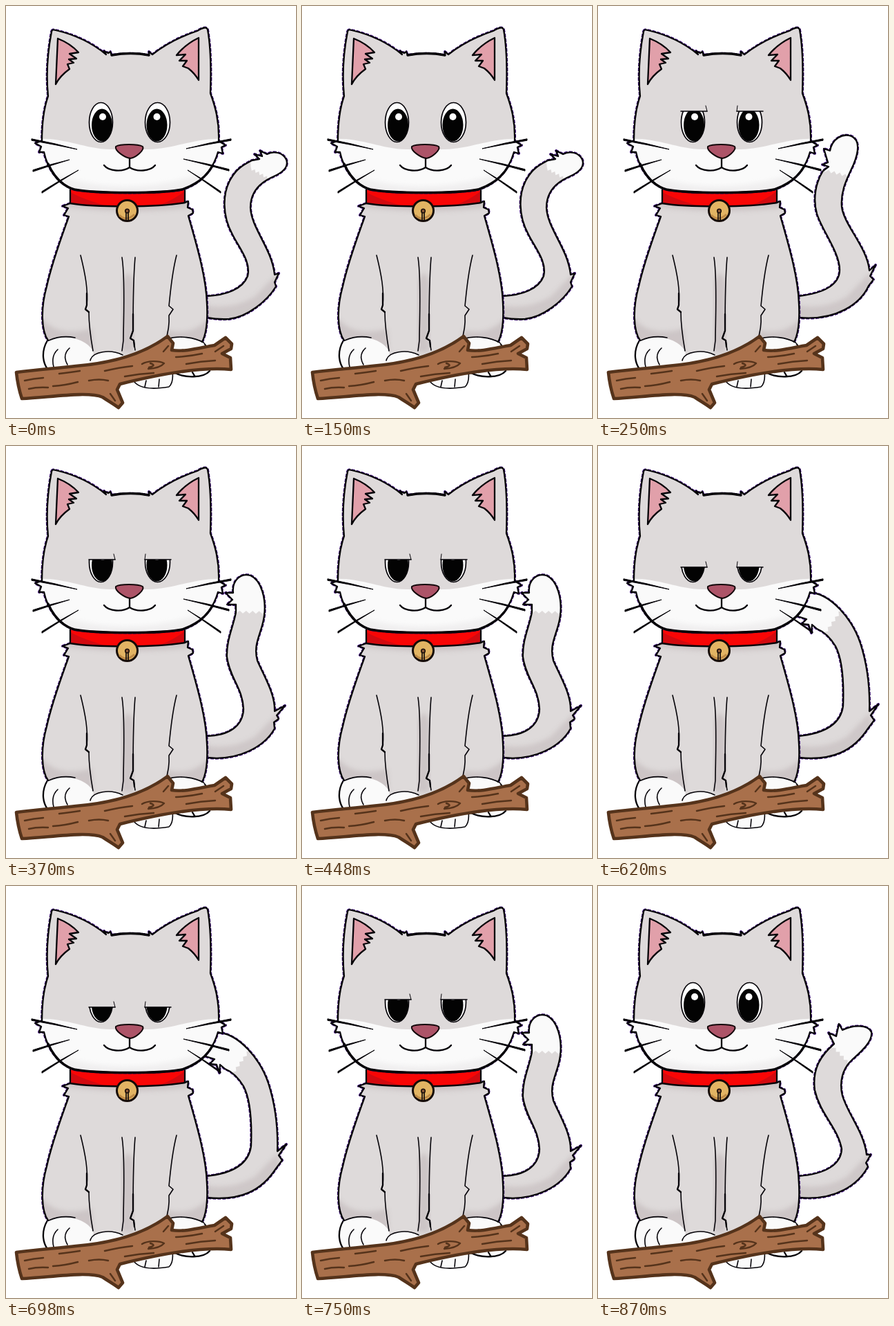
An HTML page for the animation above (1 s loop, 420 by 595 pixels).

```html
<!DOCTYPE html>
<html lang="en">
<head>
<meta charset="utf-8">
<title>Cat on a branch</title>
<style>
html, body { margin: 0; width: 100%; height: 100%; overflow: hidden; background: #fff; }
svg { display: block; width: 100vw; height: 100vh; }
.ink { fill: none; stroke: #050308; stroke-width: 2.3; stroke-linecap: round; stroke-linejoin: round; }
.thin { stroke-width: 1.6; }
.bold { stroke-width: 3.4; }
.fringe { fill: none; stroke: #3a0a78; stroke-width: 3.8; stroke-dasharray: 5 2; stroke-linejoin: round; }
.fur { fill: #dedada; }
.white { fill: #fafafa; }
.shade { fill: #c8c0c1; }
.grain { fill: none; stroke: #55331b; stroke-width: 2.4; stroke-linecap: round; stroke-linejoin: round; }
</style>
</head>
<body>
<svg viewBox="0 0 420 595">
  <defs>
    <path id="headShape" d="M66 37 Q67 33 72 35 C98 41 123 52 145 70 L142 65 L148 68 L151 66 L153 71 C170 68 191 68 207 71 L207 66 L212 70 C229 57 250 45 277 36 Q290 28 292 34 C297 62 297 97 296 126 C303 145 309 166 308 195 L318 201 L312 204 L314 213 L307 211 C300 235 284 256 255 265 C225 271 130 271 99 265 C76 257 60 235 55 211 L48 211 L51 203 L42 198 L52 195 C52 175 54 150 61 130 C58 100 60 68 66 37Z"/>
    <path id="bodyShape" d="M93 285 L82 289 L90 292 L84 302 L91 304 C80 335 67 369 59 405 C50 437 51 469 61 483 L100 506 L240 506 L284 485 C291 472 292 450 291 430 C290 392 276 345 264 303 L271 299 L270 294 L263 291 L264 282Z"/>
    <path id="sides" d="M93 285 L82 289 L90 292 L84 302 L91 304 C80 335 67 369 59 405 C50 437 51 469 61 483 M259 284 L264 282 L263 291 L270 294 L271 299 L264 303 C276 345 290 392 291 430 C292 450 291 472 284 485"/>
    <clipPath id="headClip"><use href="#headShape"/></clipPath>
    <clipPath id="bodyClip"><use href="#bodyShape"/></clipPath>
    <clipPath id="tailClip"><path id="tailMask"/></clipPath>
    <clipPath id="lidClip"><rect id="opening" x="100" width="160" height="80"/></clipPath>
    <filter id="soft"><feGaussianBlur stdDeviation="3"/></filter>
  </defs>

  <g>
    <path id="tailFringe" class="fringe"/>
    <path id="tailFur" class="fur"/>
    <g clip-path="url(#tailClip)">
      <path class="shade" filter="url(#soft)" opacity=".7" d="M288 432 Q325 440 360 420 L393 386 L398 412 L345 458 L288 458Z"/>
      <polygon id="tailTip" class="white"/>
    </g>
    <path id="tailInk" class="ink"/>
  </g>

  <g>
    <path class="white" d="M60 481 C49 498 53 515 60 524 L131 515 L126 482Z"/>
    <path class="white" d="M233 480 L285 483 C293 492 297 514 295 529 C284 539 256 537 244 529Z"/>
    <path class="ink" d="M60 483 C50 500 54 516 60 524 M284 485 Q292 491 294 502 M295 527 C286 538 258 537 245 530 M270 529 L273 534"/>
    <use href="#sides" class="fringe"/>
    <use href="#bodyShape" class="fur"/>
    <g clip-path="url(#bodyClip)">
      <path class="shade" filter="url(#soft)" opacity=".8" d="M50 448 Q72 480 124 466 L126 512 H45Z M234 468 Q268 478 295 450 V510 H230Z M80 280 H270 L262 292 Q180 301 91 291Z"/>
      <path class="shade" filter="url(#soft)" opacity=".8" d="M168 400 Q176 372 185 400 L184 500 H168Z"/>
    </g>
    <path class="white" d="M61 483 C76 476 111 475 126 498 L128 510 L75 518 L56 510Z"/>
    <path class="white" d="M232 482 C252 476 273 479 286 486 L292 501 H230Z"/>
    <path class="white" d="M122 512 C125 499 151 495 169 504 L180 518Z"/>
    <path class="white" d="M183 538 C190 555 218 553 236 550 Q243 544 241 527Z"/>
    <use href="#sides" class="ink"/>
    <path class="ink thin" d="M108 360 C115 388 119 410 117 432 L115 438 L120 442 C120 460 123 481 126 498 M168 363 C173 395 170 455 170 483 L168 498 M187 363 C184 397 184 443 184 469 L180 480 L185 483 L187 497 M247 360 C240 387 238 415 236 433 L242 438 L236 447 C237 462 234 474 231 483"/>
    <path class="ink" d="M117 415 L117 432 L115 438 L120 442 M184 445 L184 469 L180 480 L185 483 L186 492"/>
    <path class="ink thin" d="M62 483 Q80 475 100 479 M69 521 Q65 505 75 496 M89 518 Q81 504 92 494 M122 512 C125 499 151 495 169 504 M233 481 C251 475 274 479 286 486 M183 538 C190 555 218 553 236 550 Q243 544 241 527 M203 541 L201 550 M222 539 L221 550"/>
  </g>

  <g>
    <path d="M15 529 C47 525 75 523 101 520 C151 516 199 503 234 477 L242 487 L240 497 C260 500 283 493 302 490 L318 479 L327 488 L326 495 L313 502 L325 508 L326 525 C286 521 225 531 165 546 L161 554 L169 573 L163 580 C153 573 149 571 140 565 C119 556 65 565 23 567 Q17 549 15 529Z" fill="#a9704b" stroke="#55331b" stroke-width="4.6" stroke-linejoin="round"/>
    <path class="grain" d="M27 541 Q40 538 54 537 M33 553 Q45 550 61 551 M77 531 Q94 529 107 527 M68 549 Q85 548 104 543 M120 541 Q135 538 148 541 M143 527 Q164 522 183 520 M172 535 Q193 531 214 530 M197 517 C205 512 222 512 229 516 Q223 523 206 524 M209 516 Q219 519 207 522 M228 499 L235 491 M246 507 Q266 506 284 502 M261 517 Q282 513 303 512 M303 499 L315 491 M151 560 L158 570"/>
  </g>

  <g>
    <path d="M93 265 H259 V284 C220 291 130 291 93 285Z" fill="#f90606"/>
    <path d="M94 269 Q106 277 146 289 Q113 289 94 285Z M259 267 Q246 278 224 287 L259 284Z" fill="#d20a10"/>
    <path class="ink" d="M93 265 V285 C130 291 220 291 259 284 V265"/>
    <circle cx="175.500" cy="295.500" r="15" fill="#e2b463" stroke="#160c08" stroke-width="3"/>
    <path d="M164 302 Q174 312 186 301" fill="none" stroke="#be8a45" stroke-width="3"/>
    <path d="M174 298 V309 M177 298 V309" class="ink thin"/>
    <circle cx="175.500" cy="296" r="2.800" fill="#8c5936" stroke="#160c08" stroke-width="1.5"/>
  </g>

  <g>
    <use href="#headShape" class="fringe"/>
    <use href="#headShape" class="fur"/>
    <g clip-path="url(#headClip)">
      <path class="white" d="M40 192 C85 189 112 206 151 207 H207 C247 206 275 189 320 192 V280 H40Z"/>
      <path d="M72 244 Q175 279 290 241 L265 275 H90Z" fill="#e9e7e8" filter="url(#soft)" opacity=".6"/>
    </g>
    <use href="#headShape" class="ink"/>
    <path class="ink bold" d="M153 71 C170 68 191 68 207 71 M61 228 C69 246 82 260 99 265 C130 271 225 271 255 265 C276 258 291 245 299 231"/>
    <g class="ink" style="fill:#e1a0aa">
      <path d="M75 47 Q93 54 105 67 L92 69 L102 76 L91 77 L98 82 L89 84 L92 91 Q78 101 72 113Z"/>
      <path d="M279 46 Q260 55 247 71 L260 70 L251 79 L262 79 L256 87 L264 90 Q273 97 279 107Z"/>
    </g>
    <g id="eyes">
      <g clip-path="url(#lidClip)" id="balls"></g>
      <path id="lids" class="ink thin"/>
      <path id="creases" class="ink" style="stroke-width:1"/>
    </g>
    <path class="ink" id="closed" d="M122 191 Q135 197 148 192 M209 192 Q223 197 237 190"/>
    <path d="M159 203 C165 199 191 199 198 203 C201 208 188 219 180 220 C172 219 157 209 159 203Z" fill="#ad5468" stroke="#120609" stroke-width="2"/>
    <path class="ink" d="M179 220 V232 M142 230 C149 239 169 240 179 233 C189 240 209 239 216 230"/>
    <g id="whiskers" fill="#050308" stroke="#050308" stroke-linejoin="round"></g>
  </g>
</svg>
<script>
const $ = id => document.getElementById(id);

// Tail outlines run up the inner edge, round the tip and back to the base.
const poses = {
  out: {
    tail: "M290 419 C318 418 343 409 350 390 C355 369 338 350 328 330 C313 303 313 270 326 249 C335 233 347 228 356 223 L367 221 L360 214 L371 217 L368 209 L378 214 C387 209 401 211 406 222 C410 233 399 241 388 246 C367 255 354 269 354 291 C355 321 385 350 389 388 L395 386 L389 399 L391 405 C378 426 350 449 323 452 Q307 453 291 450",
    cut: [354, 234, 383, 250], beyond: "430,245 415,200 352,202"
  },
  rise: {
    tail: "M290 419 C328 415 350 402 350 381 C350 356 325 325 317 300 C311 279 315 255 326 238 L334 232 L325 229 L333 226 L327 206 L336 209 C339 192 354 183 367 188 C380 194 377 212 370 229 C361 249 351 266 353 290 C356 316 390 349 393 382 L402 374 L394 390 L399 395 L392 404 C380 430 345 455 291 450",
    cut: [326, 236, 366, 246], beyond: "390,180 315,180"
  },
  upright: {
    tail: "M290 419 C323 418 343 405 344 380 C343 350 324 335 320 305 C319 280 329 262 333 240 L333 229 L320 229 L328 222 L318 212 L329 212 C327 194 340 183 354 187 C370 194 377 221 374 245 C371 270 357 285 364 310 C375 335 390 359 389 383 L404 375 L392 389 L395 394 L388 399 L389 408 C374 435 335 455 291 450",
    cut: [329, 239, 376, 240], beyond: "388,178 310,180"
  },
  tucked: {
    tail: "M290 419 C320 418 343 405 340 380 C335 355 305 335 290 310 C280 294 276 274 277 250 L302 218 L309 204 L316 209 Q320 202 322 212 C326 232 317 255 325 280 C335 310 373 340 379 389 L387 380 L383 396 L386 408 L377 408 C365 435 330 455 291 450",
    cut: [276, 265, 326, 277], beyond: "335,195 270,200"
  },
  curled: {
    tail: "M290 419 C330 415 352 400 355 375 C356 348 355 310 344 289 C336 276 327 268 317 264 L310 258 L309 270 L305 258 L295 257 L302 250 L289 246 L304 213 L311 212 C338 216 368 249 380 285 C390 316 394 350 393 383 L406 373 L395 389 L400 396 L391 408 C370 440 340 455 291 450",
    cut: [353, 237, 327, 274], beyond: "280,280 280,200 330,200"
  },
  sway: {
    tail: "M290 419 C330 416 352 402 353 380 C348 350 322 330 314 295 C310 265 322 245 342 228 L334 212 L345 217 L349 199 L354 208 C370 200 391 200 396 211 C398 225 380 240 367 252 C354 264 349 284 354 303 C362 330 385 355 389 388 L395 388 L388 400 L391 405 C378 430 345 455 291 450",
    cut: [338, 229, 366, 258], beyond: "420,230 400,180 330,190"
  }
};

// start time, tail pose, height of the eyelid (0 open, null shut)
const steps = [
  [0, "out", 0], [250, "rise", 152], [370, "upright", 164], [500, "tucked", null],
  [620, "curled", 175], [750, "upright", 164], [870, "sway", 0]
];

function zigzag([x1, y1, x2, y2]) {
  const n = 10, len = Math.hypot(x2 - x1, y2 - y1);
  return Array.from({ length: n + 1 }, (_, i) => {
    const k = i / n, d = i % 2 ? 2.5 : -1.5;
    return [x1 + (x2 - x1) * k - (y2 - y1) / len * d, y1 + (y2 - y1) * k + (x2 - x1) / len * d];
  }).join(" ");
}

function eye(x, rx, px, glint) {
  return `<ellipse cx="${x}" cy="168" rx="${rx}" ry="28.500" fill="#fff" stroke="#050308" stroke-width="1.7"/>
    <ellipse cx="${px}" cy="172" rx="15" ry="23.500" fill="#030303"/>
    <circle cx="${glint}" cy="160" r="5" fill="#fff"/>`;
}

function whisker(x, y, tx, ty) {
  return `<path d="M${x} ${y - 1.2} Q${(x + tx) / 2} ${(y + ty) / 2 - 2} ${tx} ${ty} Q${(x + tx) / 2} ${(y + ty) / 2} ${x} ${y + 1.2}Z"/>`;
}

$("balls").innerHTML = eye(137.5, 17, 139, 140) + eye(219.5, 18, 218.5, 218.5);
$("whiskers").innerHTML = [
  [37, 193, 103, 207], [39, 238, 92, 222], [52, 269, 105, 237],
  [326, 193, 261, 206], [323, 237, 257, 221], [311, 269, 263, 237]
].map(w => whisker(...w)).join("");

function draw(time) {
  const [, name, lid] = steps.findLast(s => s[0] <= time);
  const { tail, cut, beyond } = poses[name];
  for (const id of ["tailMask", "tailFringe", "tailFur", "tailInk"]) $(id).setAttribute("d", tail);
  $("tailTip").setAttribute("points", zigzag(cut) + " " + beyond);

  const shut = lid === null;
  $("eyes").style.display = shut ? "none" : "";
  $("closed").style.display = shut ? "" : "none";
  $("opening").setAttribute("y", lid || 130);
  $("lids").setAttribute("d", lid ? `M120 ${lid} H158 M239 ${lid} H201` : "");
  $("creases").setAttribute("d", lid ? `M158 ${lid} L156 ${lid - 8} M201 ${lid} L202 ${lid - 8}` : "");
}

function tick() {
  draw(performance.now() % 1000);
  requestAnimationFrame(tick);
}
tick();
</script>
</body>
</html>
```
